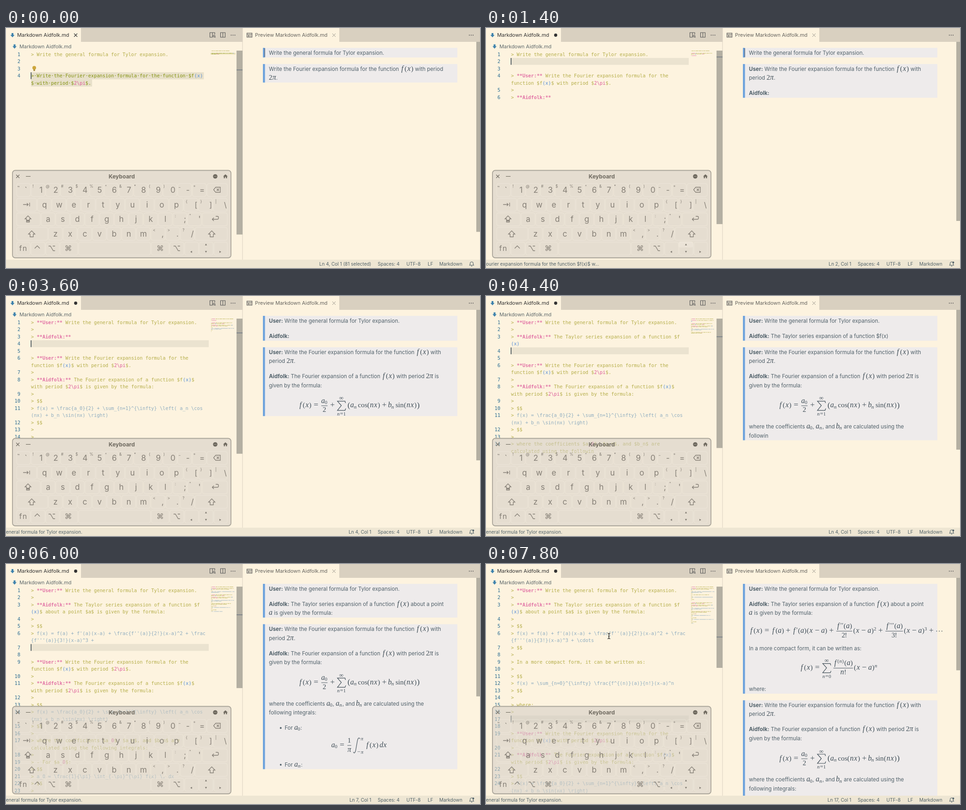
An HTML page with a canvas for the animation above (8000 ms loop, 1024 px wide and 520 px high).

```html
<!DOCTYPE html>
<html lang="en">
<head>
<meta charset="utf-8">
<title>Markdown chat</title>
<style>
html, body { margin: 0; width: 100%; height: 100%; overflow: hidden; background: #fdf3df; }
canvas { display: block; width: 1024px; height: 520px; }
</style>
</head>
<body>
<canvas id="stage"></canvas>
<script>
const W = 1024, H = 520, LOOP = 8000, STEP = 200;
const UI = 'Inter, sans-serif';
const MONO = '"DejaVu Sans Mono", monospace';
const SERIF = '"Liberation Serif", serif';
const C = {
  paper: '#fdf3df', strip: '#d9d0c0', status: '#eee6d3', row: '#ebe3d0', select: '#e8e0ca',
  slider: '#b4afa2', quote: '#b5ae4a', chosen: '#84920f', bold: '#e274a6', pink: '#dc5a98',
  blue: '#5a8fd6', tex: '#8fadc0', number: '#2a6c92', dark: '#333333', body: '#51616a',
  math: '#414f58', block: '#eeebeb', bar: '#6fa3dc', key: '#857f76', title: '#6e695f'
};
const NAME = 'Aidfolk';
const FILE = `Markdown ${NAME}.md`;

const canvas = document.getElementById('stage');
const ctx = canvas.getContext('2d');
const dpr = window.devicePixelRatio || 1;
canvas.width = W * dpr;
canvas.height = H * dpr;

// Text: "|" breaks a row in the editor, "¦" in the preview, "§" marks a streaming checkpoint.
const ASK_A = 'Write the general formula for Tylor expansion.';
const ASK_B = String.raw`Write the Fourier expansion formula for the function $f(x)|$ with period ¦$2\pi$.`;
const CHAT_A = String.raw`**User:** Write the general formula for Tylor expansion.

**Aidfolk:**§ The Taylor series expansion of a function $f|(x)$ about a point ¦$a$ is given by the formula:

$$
§f(x) = f(a) + f'(a)(x-a) + \frac{f''(a)}{2!}(x-a)^2 + \frac|{f'''(a)}{3!}(x-a)^3 + \cdots
$$

In a more compact form, it can be written as:

$$
§f(x) = \sum_{n=0}^{\infty} \frac{f^{(n)}(a)}{n!}(x-a)^n
$$

where:
§`;
const CHAT_B = String.raw`**User:** Write the Fourier expansion formula for the |function $f(x)$ with ¦period $2\pi$.

**Aidfolk:**§ The Fourier expansion of a function $f(x)$ |with period $2\pi$ is ¦given by the formula:

$$
§f(x) = \frac{a_0}{2} + \sum_{n=1}^{\infty} \left( a_n \cos|(nx) + b_n \sin(nx) \right)
$$

§where the coefficients $a_0$, $a_n$, and $b_n$ are |calculated using the ¦following integrals:

- For $a_0$:
$$
a_0 = \frac{1}{\pi} \int_{-\pi}^{\pi} f(x) \, dx
$$

§- For $a_n$:
$$
a_n = \frac{1}{\pi} \int_{-\pi}^{\pi} f(x) \cos(nx) \, dx
$$

§- For $b_n$:
$$
b_n = §`;
const TIMES_A = [3600, 5200, 6600, 7800];
const TIMES_B = [1400, 2400, 3600, 5200, 6600, 7800];

function stream(src, times, t) {
  const parts = src.split('§');
  let i = 0;
  while (i + 1 < times.length && t >= times[i + 1]) i++;
  let out = parts.slice(0, i + 1).join('');
  if (i + 1 < times.length) {
    const k = Math.max(0, (t - times[i]) / (times[i + 1] - times[i]));
    out += parts[i + 1].slice(0, Math.floor(parts[i + 1].length * k));
  }
  return out.replace(/[|¦]$/, '').split('\n');
}

// Drawing helpers
function box(x, y, w, h, color) {
  ctx.fillStyle = color;
  ctx.fillRect(x, y, w, h);
}
function say(str, x, y, size, color, { font = UI, style = '', align = 'left' } = {}) {
  ctx.font = `${style} ${size}px ${font}`;
  ctx.textAlign = align;
  ctx.fillStyle = color;
  ctx.fillText(str, x, y + size * 0.36);
  return x + ctx.measureText(str).width;
}
function icon(path, x, y, color, width = 1.1, fill = false) {
  ctx.save();
  ctx.translate(x, y);
  const p = new Path2D(path);
  ctx.strokeStyle = ctx.fillStyle = color;
  ctx.lineWidth = width;
  if (fill) ctx.fill(p); else ctx.stroke(p);
  ctx.restore();
}
function dot(x, y, r, color) {
  ctx.fillStyle = color;
  ctx.beginPath();
  ctx.arc(x, y, r, 0, 7);
  ctx.fill();
}
function round(x, y, w, h, r) {
  ctx.beginPath();
  ctx.roundRect(x, y, w, h, r);
}
function clipped(x, y, w, h, draw) {
  ctx.save();
  ctx.beginPath();
  ctx.rect(x, y, w, h);
  ctx.clip();
  draw();
  ctx.restore();
}
const dots = (x, y, color) => [-4, 0, 4].forEach(d => dot(x + d, y, 1, color));
const CROSS = 'M-3.5-3.5L3.5 3.5M3.5-3.5L-3.5 3.5';

// Math: advances in em, glyphs centred in their advance
const EM = 14.46;
const ADV = {
  f: 0.598, a: 0.529, x: 0.572, n: 0.6, b: 0.429, d: 0.52, 'π': 0.58, '(': 0.389, ')': 0.389,
  '[': 0.458, ']': 0.458, '!': 0.278, ',': 0.445, "'": 0.235, ' ': 0.167, '⋯': 1.172
};
function math(x, y, src, size = EM, ink = true) {
  const glyph = (ch, cx, dy, scale, style = '') => {
    if (!ink) return;
    ctx.font = `${style} ${size * scale}px ${SERIF}`;
    ctx.textAlign = 'center';
    ctx.fillStyle = C.math;
    ctx.fillText(ch, cx, y + dy);
  };
  for (const [tok] of src.matchAll(/\\(cos|sin)|[_^](\{[^}]*\}|.)|./g)) {
    if (tok[0] === '\\') {
      const w = (tok === '\\cos' ? 1.338 : 1.228) * size;
      x += 0.167 * size;
      glyph(tok.slice(1), x + w / 2, 0, 1.06);
      x += w;
    } else if (tok[0] === '_' || tok[0] === '^') {
      const dy = (tok[0] === '_' ? 0.15 : -0.38) * size;
      x = math(x, y + dy, tok.slice(1).replace(/[{}]/g, ''), size * 0.7, ink) + 0.05 * size;
    } else if ('=+−'.includes(tok)) {
      const pad = size < 12 ? 0 : tok === '=' ? 0.278 : 0.222;
      const w = (0.778 + 2 * pad) * size;
      glyph(tok, x + w / 2, 0, 1.22);
      x += w;
    } else {
      const w = (ADV[tok] || 0.5) * size;
      if (tok === '⋯') [0.2, 0.59, 0.98].forEach(k => ink && dot(x + k * size, y - 0.25 * size, 0.9, C.math));
      else if (tok === "'") glyph('′', x + w / 2, -0.05 * size, 0.95);
      else if (tok === '[' || tok === ']') glyph(tok === '[' ? '(' : ')', x + w / 2, 0.04 * size, 1.22);
      else if (tok === ',') glyph(tok, x + 0.14 * size, 0, 1);
      else if (tok !== ' ') {
        const italic = /[a-zπ]/.test(tok);
        glyph(tok, x + (tok === 'f' ? 0.29 * size : w / 2), 0, italic ? 1.1 : 1.05, italic ? 'italic' : '');
      }
      x += w;
    }
  }
  return x;
}
const mathWidth = (src, size) => math(0, 0, src, size, false);

const frac = (top, bottom) => (x, y) => {
  const a = mathWidth(top), b = mathWidth(bottom), w = Math.max(a, b);
  x += 0.12 * EM;
  math(x + (w - a) / 2, y - 0.68 * EM, top);
  math(x + (w - b) / 2, y + 0.69 * EM, bottom);
  box(x, y - 0.28 * EM, w, 0.9, C.math);
  return x + w + 0.12 * EM;
};
const sum = from => (x, y) => {
  const mid = y - 0.25 * EM, cx = x + 0.72 * EM;
  icon('M9-6L8-10H-8.5L0-0.5L-8.5 10H8L9.5 6', cx, mid, C.math, 1.2);
  say('∞', cx, mid - 17, 13, C.math, { font: SERIF, align: 'center' });
  math(cx - mathWidth(from, 10) / 2, mid + 21, from, 10);
  return x + 1.611 * EM;
};
const integral = (x, y) => {
  const mid = y - 0.25 * EM;
  icon('M15-14C14-18 11-17 9.5-10L6 10C4.5 17 2 18 1 14', x + 2, mid, C.math, 1.1);
  math(x + 18.5, mid - 11, 'π', 10);
  math(x + 11, mid + 17.5, '−π', 10);
  return x + 29;
};
const FORMULAS = [
  { tex: 'f(x) = \\frac', x: 632, h: 43, mid: 21,
    parts: ['f(x)=', frac('a_0', '2'), '+', sum('n=1'), '[a_n\\cos(nx)+b_n\\sin(nx)]'] },
  { tex: 'f(x) = f(a)', x: 569, h: 30, mid: 16,
    parts: ["f(x)=f(a)+f'(a)(x−a)+", frac("f''(a)", '2!'), '(x−a)^2+', frac("f'''(a)", '3!'), '(x−a)^3+⋯'] },
  { tex: 'f(x) = \\sum', x: 678, h: 41.5, mid: 19.5,
    parts: ['f(x)=', sum('n=0'), frac('f^{(n)}(a)', 'n!'), '(x−a)^n'] },
  { tex: 'a_0', x: 703, h: 33, mid: 15,
    parts: ['a_0=', frac('1', 'π'), integral, 'f(x) dx'] },
  { tex: 'a_n', x: 680, h: 33, mid: 15,
    parts: ['a_n=', frac('1', 'π'), integral, 'f(x)\\cos(nx) dx'] }
];

// Preview pane
const LINE = 19.3, GAP = 13.7;
function previewItems(lines) {
  const items = [];
  let tex = null;
  for (const raw of lines) {
    const line = raw.replace(/\|/g, '');
    if (line === '$$') {
      const formula = tex && FORMULAS.find(f => tex.startsWith(f.tex));
      if (formula) items.push({ formula, h: formula.h });
      tex = tex === null ? '' : null;
    } else if (tex !== null) tex += line;
    else if (line) {
      const bullet = line.startsWith('- ');
      const rows = (bullet ? line.slice(2) : line).split('¦');
      items.push({ bullet, rows, h: rows.length * LINE });
    }
  }
  return items;
}
function richRow(row, x, y) {
  for (const part of row.split(/(\*\*.+?\*\*|\$[^$]+\$)/)) {
    if (!part) continue;
    if (/^\$.+\$$/.test(part)) x = math(x, y + 4.1, part.slice(1, -1).replace('\\pi', 'π'));
    else if (part.startsWith('**')) x = say(part.replace(/\*/g, ''), x, y, 11.5, C.body, { style: '700' });
    else x = say(part, x, y, 11.5, C.body);
  }
}
function previewBlock(lines, top, active) {
  const items = previewItems(lines);
  const height = items.reduce((h, it) => h + it.h + GAP, 1.5 - GAP);
  box(555, top, 420, height, C.block);
  box(555, top, 4.5, height, C.bar);
  if (active) box(558, top + 1, 1.6, height - 2, '#64748a');
  let y = top + 1.1;
  for (const it of items) {
    if (it.formula) {
      const base = y + it.formula.mid + 0.25 * EM;
      it.formula.parts.reduce((x, p) => typeof p === 'string' ? math(x, base, p) : p(x, base), it.formula.x);
    } else {
      if (it.bullet) dot(593.5, y + LINE / 2 + 0.5, 1.9, C.body);
      it.rows.forEach((row, i) => richRow(row, it.bullet ? 602 : 568, y + LINE * (i + 0.5)));
    }
    y += it.h + GAP;
  }
  return top + height;
}
function preview(a, b, step) {
  let bottom;
  clipped(512, 30, 504, 472, () => {
    bottom = previewBlock(b, previewBlock(a, 43, step < 8) + 14.3, false);
  });
  box(1016, 30, 8, 472 * 472 / (bottom + 423), C.slider);
}

// Editor pane
const CW = 6.19, ROW = 15.5, LEFT = 54, TOP = 49;
function tint(line, tex, base) {
  const ink = Array(line.length).fill(tex ? 'tex' : base);
  const mark = (re, style) => {
    for (const m of line.matchAll(re)) ink.fill(style, m.index, m.index + m[0].length);
  };
  if (!tex) {
    mark(/\([a-z]\)/g, 'blue');
    mark(/2\\pi/g, 'pink');
    mark(/_\d/g, 'pink');
    mark(/\*\*.+?\*\*/g, 'bold');
  }
  if (line) ink[0] = base;
  return ink;
}
function editorRows(lines, picked) {
  const rows = [];
  let tex = false;
  lines.forEach((raw, n) => {
    if (raw === null) {
      tex = false;
      rows.push({ line: n + 1, runs: [], cols: 0 });
      return;
    }
    const fence = raw === '$$';
    const line = raw ? '> ' + raw.replace(/¦/g, '') : '>';
    const ink = tint(line, tex && !fence, n + 1 === picked ? 'chosen' : 'quote');
    let row = { line: n + 1, runs: [], cols: 0 };
    rows.push(row);
    [...line].forEach((ch, i) => {
      if (ch === '|') {
        rows.push(row = { line: n + 1, runs: [], cols: 0, wrapped: true });
        return;
      }
      const last = row.runs[row.runs.length - 1];
      const glyph = ch === ' ' && n + 1 === picked ? '·' : ch;
      if (last && last.ink === ink[i]) last.text += glyph;
      else row.runs.push({ ink: ink[i], col: row.cols, text: glyph });
      row.cols++;
    });
    if (fence) tex = !tex;
  });
  return rows;
}
function minimap(rows, picked) {
  ctx.globalAlpha = 0.7;
  rows.forEach((row, r) => {
    const y = TOP + r * 1.72;
    if (row.line === picked) box(442, y - 0.2, 54, 1.8, '#e4dca8');
    for (const run of row.runs)
      for (const m of run.text.matchAll(/[^ ·]+/g))
        box(443 + (run.col + m.index) * 0.83, y, m[0].length * 0.83 - 0.2, 1.1, C[run.ink]);
  });
  ctx.globalAlpha = 1;
}
function bulb(y) {
  dot(61, y - 1.5, 4, '#cda63c');
  box(59.3, y + 2, 3.4, 3.4, '#a98a3a');
}
function editor(lines, cursor, picked, step) {
  const rows = editorRows(lines, picked);
  const at = rows.findIndex(r => r.line === cursor);
  const extent = 453 + (rows.length - 1) * ROW;
  clipped(0, TOP - 1, 511, 454, () => {
    rows.forEach((row, r) => {
      const top = TOP + 0.3 + r * ROW, y = top + 7.7;
      if (row.line === picked) box(LEFT, top, row.cols * CW + (picked === 1 ? 8 : 2), ROW, C.select);
      else if (!picked && row.line === cursor) box(LEFT, top, 384, ROW - 0.5, C.row);
      if (!row.wrapped) say(row.line, 31, y, 10.3, C.number, { font: MONO, align: 'right' });
      for (const run of row.runs)
        say(run.text, LEFT + run.col * CW, y, 10.28, C[run.ink], { font: MONO, style: run.ink === 'bold' ? '700' : '' });
    });
    if (step % 4 !== 1) box(LEFT - 0.7, TOP + 0.5 + at * ROW, 1.8, ROW - 0.8, '#4d5a60');
    if (picked) bulb(TOP + (picked === 1 ? 1.5 : 2.5) * ROW);
    minimap(rows, picked);
  });
  box(498, TOP, 13, 453 * 453 / extent, C.slider);
  box(498, TOP + at * ROW * 453 / extent, 13, 1.8, '#7d8389');
}

// On-screen keyboard
const KEYCAPS = [
  [351, [22], 53.6, 12, [479]],
  [383, [22], 67, 12, [479]],
  [414.5, [22], 75, 11, [479]],
  [446, [22], 91, 10, [479]],
  [478, [22, 53, 85, 116, 156, 313, 353], 385, 2, [479]]
];
const ICONS = {
  shift: 'M0-7L7 0H3.5V6H-3.5V0H-7Z',
  caps: 'M0-7L6.5-0.5H3.2V2.5H-3.2V-0.5H-6.5ZM-3.2 4H3.2V6.5H-3.2Z',
  tab: 'M-7 0H4M1-3L4 0L1 3M7-4V4',
  enter: 'M-3-2L-6.5 1.5L-3 5M-6.5 1.5H4.5Q7 1.5 7-1V-2.5Q7-5 4.5-5H1',
  erase: 'M-7.5 0L-3-5.5H7V5.5H-3ZM-0.8-2.5L4.2 2.5M4.2-2.5L-0.8 2.5',
  option: 'M-7-5H-3L3 5H7M2-5H7',
  control: 'M-5.5 2.5L0-3L5.5 2.5'
};
function keyLine(chars, x, y, size = 17, pitch = 31.65) {
  [...chars].forEach((ch, i) => say(ch, x + i * pitch, y, size, C.key, { align: 'center' }));
}
function keyboard(pressed) {
  round(14, 308.5, 472, 189.5, 6);
  ctx.fillStyle = 'rgba(211,206,196,0.56)';
  ctx.fill();
  ctx.strokeStyle = '#aaa59a';
  ctx.lineWidth = 1.8;
  ctx.stroke();

  ctx.lineWidth = 0.8;
  ctx.strokeStyle = 'rgba(255,249,234,0.4)';
  for (const [y, head, start, count, tail] of KEYCAPS) {
    const edges = [...head, ...Array.from({ length: count + 1 }, (_, i) => start + i * 31.65), ...tail];
    edges.slice(0, -1).forEach((x, i) => {
      round(x + 1, y - 14, edges[i + 1] - x - 2, 28, 4);
      ctx.stroke();
    });
  }
  ctx.fillStyle = 'rgba(255,249,234,0.25)';
  if (pressed === 'up') round(416, 462.5, 31, 13, 3);
  if (pressed === 'shift') round(412, 433, 67, 27, 4);
  if (pressed) ctx.fill();

  say('Keyboard', 250, 322, 12, C.title, { style: '700', align: 'center' });
  icon(CROSS, 25.5, 321.5, C.title);
  icon('M-5 0H5', 48, 321.5, C.title);
  dot(452, 321.5, 4.8, C.title);
  [-2, 0, 2].forEach(d => dot(452 + d, 321.5, 0.6, '#e6dfd0'));
  icon('M0-4.5L5 0H3.5V4H1V1H-1V4H-3.5V0H-5Z', 474, 321.5, C.title, 1, true);

  keyLine('1234567890', 75.7, 351);
  keyLine('!@#$%^&*()', 58.5, 343, 8.5, 31.45);
  keyLine('qwertyuiop', 83.3, 383);
  keyLine('asdfghjkl', 91, 414);
  keyLine('zxcvbnm', 107, 446);
  keyLine('`', 43, 351);
  keyLine('-=', 393, 351, 17, 30.5);
  keyLine('~', 27, 343, 8.5);
  keyLine('_+', 375, 342, 8.5, 32);
  keyLine('[]\\', 410.5, 383, 16);
  keyLine('{}|', 390, 376, 8.5);
  keyLine(";'", 386.5, 414);
  keyLine(':"', 366, 407, 8.5);
  keyLine(',./', 338.5, 446, 17, 32);
  keyLine('<>?', 320, 438, 8.5);
  keyLine('fn', 31.5, 477.5, 16, 9);
  for (const [name, x, y] of [['erase', 456, 350.5], ['tab', 44, 382.5], ['caps', 47.5, 414], ['enter', 452, 413],
    ['shift', 55.5, 446.5], ['shift', 444.5, 446.5], ['control', 67.5, 475], ['option', 99, 477.5], ['option', 369, 477.5]])
    icon(ICONS[name], x, y, C.key, 1.3);
  for (const x of [134.5, 333]) say('⌘', x, 477.5, 16, C.key, { font: '"DejaVu Sans", sans-serif', align: 'center' });
  icon('M2-2.2V2.2L-2 0Z', 400, 485, C.key, 1, true);
  icon('M-2.2 2H2.2L0-2Z', 432, 469, C.key, 1, true);
  icon('M-2.2-2H2.2L0 2Z', 432, 485, C.key, 1, true);
  icon('M-2-2.2V2.2L2 0Z', 463, 485, C.key, 1, true);
}

// Window frame
function fileArrow(x, y) {
  icon('M-2-4.5H2V-0.5H4.5L0 4.8L-4.5-0.5H-2Z', x, y, '#3f83ad', 1, true);
}
function chrome(dirty) {
  box(0, 0, W, 30, C.strip);
  box(0, 0, 162, 30, C.paper);
  box(511, 0, 209, 30, C.paper);
  box(510.5, 0, 1, 502, C.strip);
  fileArrow(14, 15.5);
  say(FILE, 24, 15.5, 10.9, C.dark);
  if (dirty) dot(150.5, 15.5, 3.4, C.dark);
  else icon(CROSS, 150.5, 15.5, C.dark);
  icon('M0.5 5H-5.5V-5H5V-1M0-5V5M3.5 0.5A2 2 0 1 0 3.6 0.5M5 4L6.5 5.5', 446, 15, '#555');
  icon('M-5-5H5V5H-5ZM0-5V5', 468.5, 15, '#555');
  dots(490.5, 15.5, '#555');
  icon('M-5.5-4.5H5.5V4.5H-5.5ZM-5.5-2H5.5M-3 0.5H-0.5V2.5H-3ZM1.5 0.5H4M1.5 2.5H4', 526, 15.5, '#555');
  say('Preview ' + FILE, 538, 15.5, 10.9, '#66645f');
  icon(CROSS, 708.5, 15.5, '#8a867d', 0.9);
  dots(1005, 15.5, '#555');
  fileArrow(18.5, 40);
  say(FILE, 29, 40.5, 10.9, '#5f6a6c');
}
function statusBar(message, place, busy) {
  box(0, 502, W, 18, C.status);
  const color = '#536369';
  say(message, 0, 511.5, 10, color);
  say(place, 789, 511.5, 10, color, { align: 'right' });
  [['Spaces: 4', 803], ['UTF-8', 865], ['LF', 911], ['Markdown', 936]].forEach(([s, x]) => say(s, x, 511.5, 10, color));
  icon('M-4.5 2.5H4.5L3.3 0.5V-1.5A3.3 3.3 0 0 0-3.3-1.5V0.5ZM-1.2 4.4H1.2', 1006, 511.5, color);
  if (busy) dot(1009.5, 508, 2, color);
}

const CLIMB = [6, 6, 5, 4, 3, 2, 1, 1];
function render(t) {
  const step = Math.floor(t / STEP), now = step * STEP;
  const sentB = step >= 2, sentA = step >= 15;
  const a = sentA ? stream(CHAT_A, TIMES_A, now) : [ASK_A];
  const b = sentB ? stream(CHAT_B, TIMES_B, now) : [ASK_B];
  const picked = !sentB ? 4 : step >= 10 && !sentA ? 1 : 0;
  const cursor = picked || (sentA ? a.length + 1 : CLIMB[step - 2]);
  const chosen = picked ? ` (${picked === 4 ? 81 : 49} selected)` : '';

  ctx.setTransform(dpr, 0, 0, dpr, 0, 0);
  box(0, 0, W, H, C.paper);
  chrome(sentB);
  editor([...a, null, null, ...b], cursor, picked, step);
  preview(a, b, step);
  keyboard(step >= 4 && step < 9 ? 'up' : step >= 9 && step < 13 ? 'shift' : '');
  const message = sentA ? 'eneral formula for Tylor expansion.'
    : sentB ? 'ourier expansion formula for the function $f(x)$ w...' : '';
  statusBar(message, `Ln ${cursor}, Col 1${chosen}`, sentB);
  if (step === 39) icon('M-3-6Q0-6 0-4Q0-6 3-6M0-4V4M-3 6Q0 6 0 4Q0 6 3 6M-1.5 1H1.5', 265.5, 156, '#222', 1.2);
}

function tick() {
  render(performance.now() % LOOP);
  requestAnimationFrame(tick);
}
tick();
</script>
</body>
</html>
```
